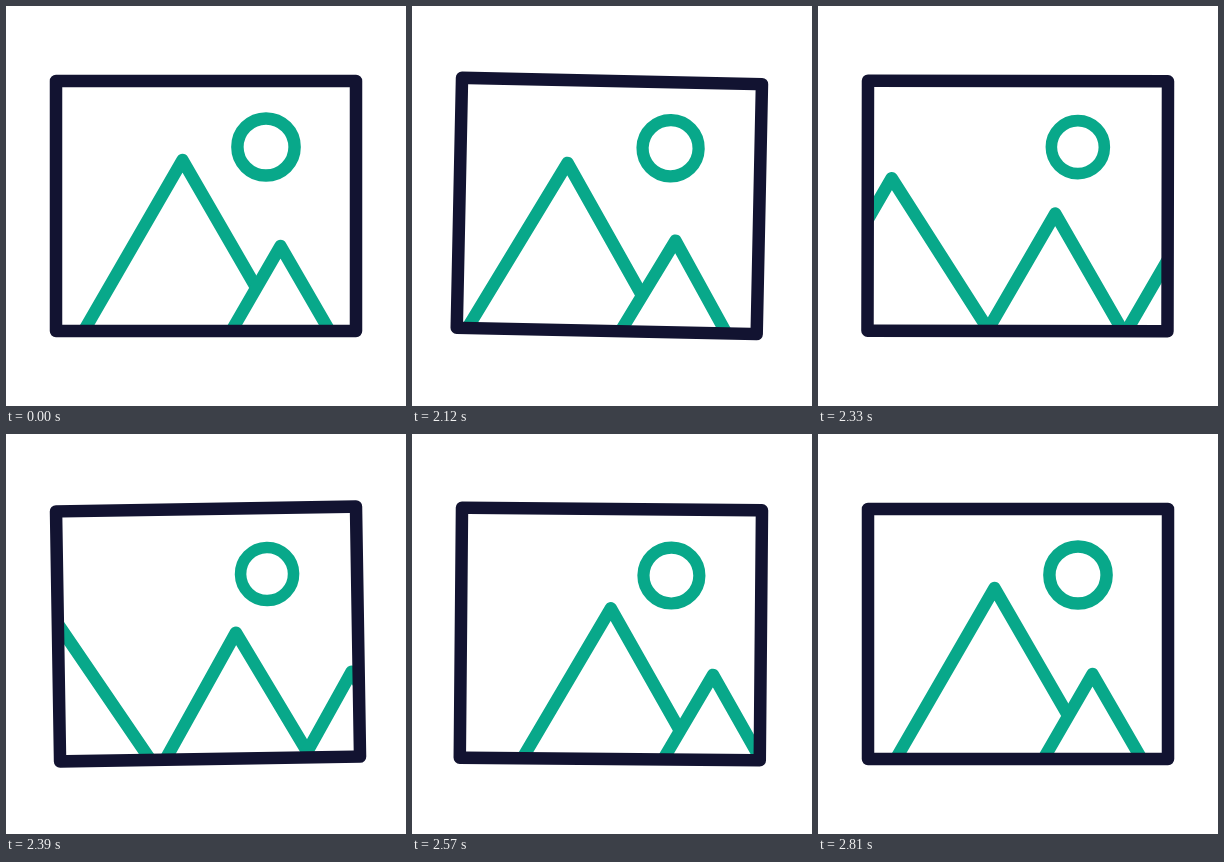
Recreate the animation shown at these times as an HTML page. Size 400 px wide and 400 px high, loop 2840 ms.

```html
<!DOCTYPE html>
<html lang="en">
<head>
<meta charset="utf-8">
<title>Sliding picture icon</title>
<style>
  html, body { margin: 0; width: 100%; height: 100%; overflow: hidden; background: #fff; }
  svg { display: block; width: 100vw; height: 100vh; }
  path, circle, rect { stroke-width: 12.5; stroke-linecap: round; stroke-linejoin: round; }
  .green { fill: #fff; stroke: #08a88a; }
  .frame { fill: none; stroke: #121331; }
</style>
</head>
<body>
<svg viewBox="0 0 400 400">
  <clipPath id="inside"><rect x="50" y="75" width="300" height="250"/></clipPath>
  <g id="picture">
    <g clip-path="url(#inside)">
      <path id="leaving" class="green"/>
      <path id="growing" class="green"/>
      <path id="arriving" class="green"/>
    </g>
    <g id="sun"><circle class="green" cx="260" cy="141" r="28.6"/></g>
    <rect class="frame" x="50" y="75" width="300" height="250"/>
  </g>
</svg>
<script>
const LOOP = 2840, HOLD = 2000, STEP = 30, LAST = 27;
const SLOPE = Math.tan(Math.PI / 6);
const FLOOR = 345;

const el = id => document.getElementById(id);
const parts = Object.fromEntries(
  ['picture', 'leaving', 'growing', 'arriving', 'sun'].map(id => [id, el(id)]));

const smooth = u => {
  u = Math.min(1, Math.max(0, u));
  return u * u * (3 - 2 * u);
};

// cubic-bezier(.25, 0, .75, 1), solved with Newton's method.
function slide(u) {
  let s = u;
  for (let i = 0; i < 5; i++) {
    const x = s * (0.75 + s * (0.75 - 0.5 * s));
    s -= (x - u) / (0.75 + 1.5 * s * (1 - s));
  }
  return smooth(s);
}

// Eased value between [step, value] keys.
function track(keys, n) {
  let value = keys[0][1];
  for (let i = 1; i < keys.length; i++) {
    const [from, a] = keys[i - 1], [to, b] = keys[i];
    value += (b - a) * smooth((n - from) / (to - from));
  }
  return value;
}

const SWING = [[0, 0], [7, 2], [14, -1.1], [19.5, 0.55], [LAST, 0]];
const SHRINK = [[0, 1], [12, 0.925], [23, 1]];

function mountain(path, x, y, rightSlope = SLOPE) {
  const drop = FLOOR - y;
  path.setAttribute('d',
    `M${x - drop * SLOPE} ${FLOOR}L${x} ${y}L${x + drop * rightSlope} ${FLOOR}`);
}

function draw(n) {
  const p = slide(n / LAST), rest = Math.max(0, 1 - p);

  mountain(parts.leaving, 176.5 - p * (240 + 85 * p), 154 + 49 * p, SLOPE + 0.17 * p);
  mountain(parts.growing, 274.5 - 98 * p, 240 - 86 * p);
  mountain(parts.arriving, 274.5 + 98 * rest + 48 * rest ** 1.6, 240);

  parts.picture.setAttribute('transform', `rotate(${track(SWING, n)} 200 75)`);
  parts.sun.setAttribute('transform',
    `translate(260 141) scale(${track(SHRINK, n)}) translate(-260 -141)`);
}

const start = performance.now();

function tick() {
  const t = (performance.now() - start) % LOOP;
  draw(Math.min(LAST, Math.max(0, Math.floor((t - HOLD) / STEP))));
  requestAnimationFrame(tick);
}
tick();
</script>
</body>
</html>
```
